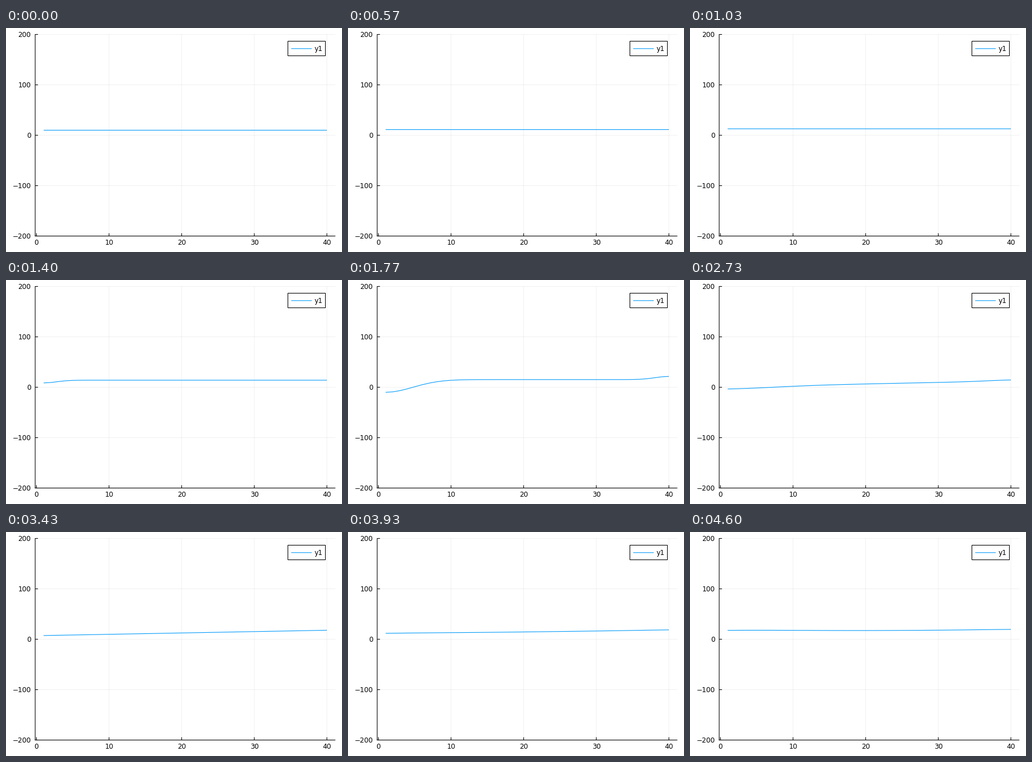
Recreate the animation shown at these times as a matplotlib script. Size 600 by 400 pixels, loop 4.63 s.

```python
import numpy as np
import matplotlib.pyplot as plt
from matplotlib.animation import FuncAnimation
from matplotlib.patches import Rectangle

W, H, DPI = 600, 400, 100
LOOP_MS, TICK_MS = 4630, 10
STEPS_PER_TICK = 0.3  # the simulation runs at 30 steps a second
PX = 72 / DPI  # one pixel in points
BLUE = "#009afa"
LEFT, RIGHT, TOP, BOTTOM = 52.1, 588.2, 11.5, 371.5
CELLS = np.arange(1, 41)

plt.rcParams["font.family"] = "DejaVu Sans"
plt.rcParams["path.snap"] = False


def to_x(v):
    return 54.3 + 12.968 * v


def to_y(v):
    return 191.5 - 0.9 * v


def ramp(step, *points):
    """Straight moves between (step, value) points."""
    return np.interp(step, *zip(*points))


def bump(distance, width):
    return np.exp(-(distance / width) ** 2)


def profile(step):
    """A tilted line with a cold bump at the left end and a warm one at the right."""
    level = ramp(step, (6, 10), (54, 15.3), (82, 6.7), (103, 12.6), (138, 16.9))
    tilt = ramp(step, (54, 0), (82, 0.3), (103, 0.27), (138, 0.1))
    cold = ramp(step, (39, 0), (54, 27), (82, 4.3), (103, 0), (138, -2.7))
    warm = ramp(step, (44, 0), (54, 7), (68, 13.5), (82, 1.9), (103, 0), (138, 0.7))
    spread = np.sqrt(2 * max(step - 39, 1))  # diffusion widens both bumps
    return (level + tilt * (CELLS - 20.5)
            - cold * bump(CELLS - 1, spread)
            + warm * bump(40 - CELLS, spread / 2))


fig = plt.figure(figsize=(W / DPI, H / DPI), dpi=DPI, facecolor="white")
ax = fig.add_axes([0, 0, 1, 1])
ax.set_xlim(0, W)
ax.set_ylim(H, 0)
ax.axis("off")


def segment(x0, y0, x1, y1, color="black", width=1.1, **kw):
    ax.plot([x0, x1], [y0, y1], color=color, lw=width * PX,
            solid_capstyle="butt", **kw)


def label(x, y, text, align, zorder=3):
    ax.text(x, y, text, ha=align, va="baseline", fontsize=8.7, zorder=zorder)


def number(v):
    return str(v).replace("-", "\u2212")


for v in range(0, 41, 10):
    x = to_x(v)
    segment(x, TOP, x, BOTTOM, width=1, alpha=0.06, zorder=1)
    segment(x, BOTTOM, x, BOTTOM - 5, zorder=3)
    label(x, 387, number(v), "center")

for v in range(-200, 201, 100):
    y = to_y(v)
    segment(LEFT, y, RIGHT, y, width=1, alpha=0.06, zorder=1)
    segment(LEFT, y, LEFT + 5, y, zorder=3)
    label(44.6, y + 4.4, number(v), "right")

segment(LEFT, TOP - 0.5, LEFT, BOTTOM + 0.5, zorder=3)
segment(LEFT - 0.5, BOTTOM, RIGHT, BOTTOM, zorder=3)

curve, = ax.plot([], [], color=BLUE, lw=1.1 * PX, solid_capstyle="butt",
                 solid_joinstyle="round", zorder=4)

# Legend
ax.add_patch(Rectangle((503.4, 23.6), 67, 26, facecolor="white",
                       edgecolor="black", lw=1.1 * PX, zorder=5))
segment(509.3, 36.8, 546, 36.8, color=BLUE, zorder=6)
label(551, 41.4, "y1", "left", zorder=6)


def draw(tick):
    step = int((tick + 0.5) * STEPS_PER_TICK)
    curve.set_data(to_x(CELLS), to_y(profile(step)))
    return curve,


anim = FuncAnimation(fig, draw, frames=LOOP_MS // TICK_MS, interval=TICK_MS,
                     repeat=True, repeat_delay=0)
plt.show()
```
